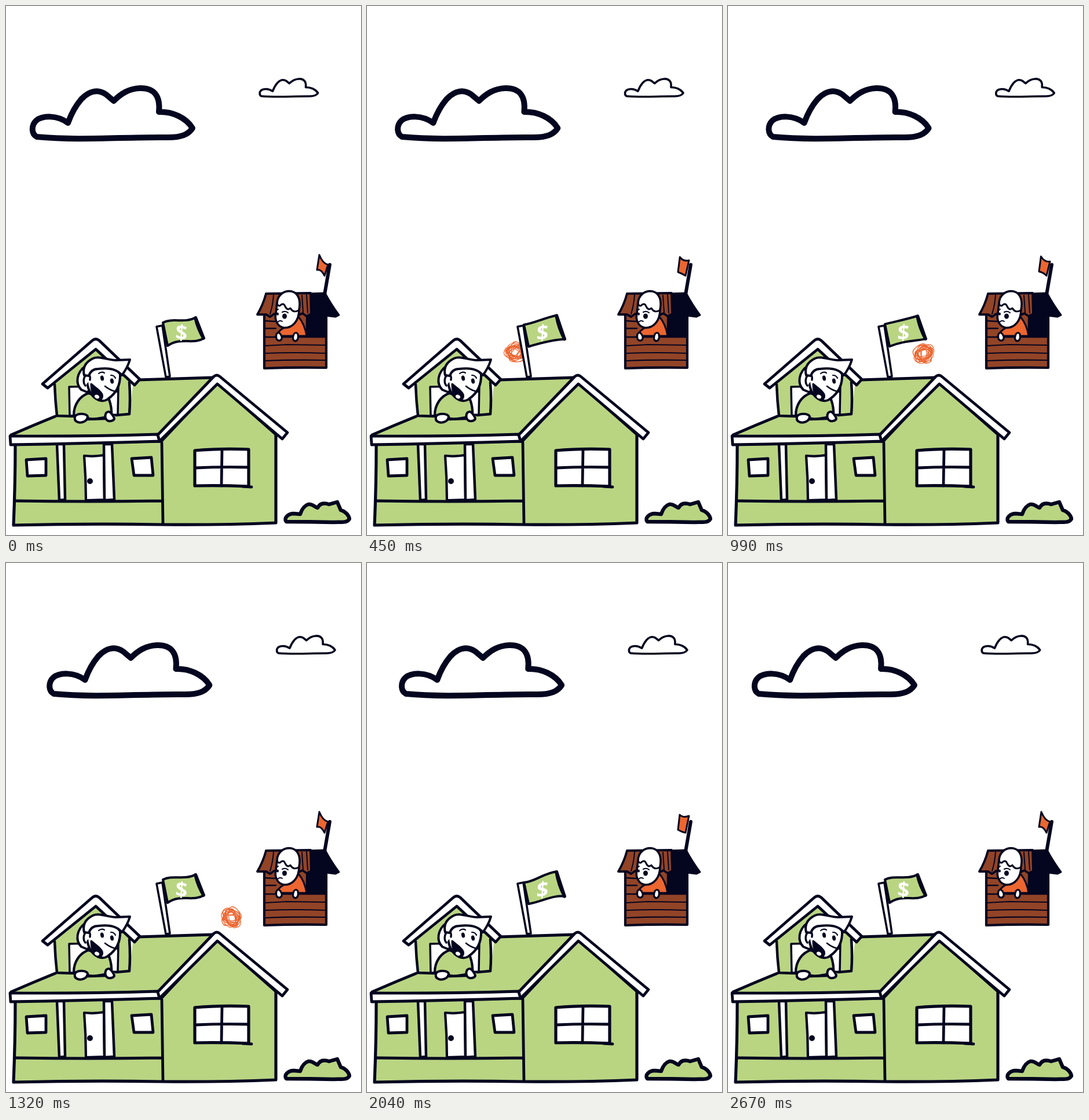
Write an HTML page with a canvas that moves like this. It is 613 by 914 pixels and loops after 2.7 s.

```html
<!DOCTYPE html>
<html lang="en">
<head>
<meta charset="utf-8">
<title>Two houses</title>
<style>
html, body { margin: 0; width: 100%; height: 100%; overflow: hidden; background: #fff; }
canvas { display: block; }
</style>
</head>
<body>
<canvas id="stage" width="613" height="914"></canvas>
<script>
const ctx = document.getElementById('stage').getContext('2d');
const INK = '#04051f', GREEN = '#b9d582', BROWN = '#924427', ORANGE = '#ec6630', WHITE = '#fff';
const LOOP = 2700, STEP = 30, TAU = Math.PI * 2;

ctx.lineJoin = ctx.lineCap = 'round';

function shape(d, fill, width = 5, stroke = INK) {
  const path = typeof d === 'string' ? new Path2D(d) : d;
  if (fill) { ctx.fillStyle = fill; ctx.fill(path); }
  if (width) { ctx.lineWidth = width; ctx.strokeStyle = stroke; ctx.stroke(path); }
}

function oval(x, y, rx, ry, fill, width = 0, tilt = 0) {
  const path = new Path2D();
  path.ellipse(x, y, rx, ry, tilt, 0, TAU);
  shape(path, fill, width);
}

const mix = (a, b, k) => a + (b - a) * k;

// Fills the blanks of a path with values blended between two poses.
function blend(text, from, to, k) {
  let i = 0;
  return text.replace(/_/g, () => { const v = mix(from[i], to[i], k); i++; return v.toFixed(2); });
}

const CLOUD = new Path2D('M53 226C44 221 43 207 52 198C63 189 88 188 107 202C112 188 118 175 130 161' +
  'C145 145 160 144 173 153L186 164C199 151 212 143 231 142C256 141 267 156 264 183' +
  'C287 182 311 193 322 211C315 222 303 227 280 227C200 226 130 233 53 226Z');

function clouds(dx) {
  ctx.save();
  ctx.translate(dx, 0);
  shape(CLOUD, WHITE, 10);
  ctx.translate(421.5, 75.5);
  ctx.scale(0.364, 0.355);
  shape(CLOUD, WHITE, 10);
  ctx.restore();
}

function makeScribble() {
  let seed = 11;
  const random = () => (seed = (seed * 16807) % 2147483647) / 2147483647;
  const point = i => {
    const r = 16 + 11 * random(), a = i * 2 + random();
    return [r * Math.cos(a), r * Math.sin(a)];
  };
  const path = new Path2D();
  let last = point(0);
  for (let i = 1; i < 46; i++) {
    const next = point(i);
    const middle = [(last[0] + next[0]) / 2, (last[1] + next[1]) / 2];
    if (i === 1) path.moveTo(...middle);
    else path.quadraticCurveTo(...last, ...middle);
    last = next;
  }
  return path;
}
const SCRIBBLE = makeScribble();

function ball(t) {
  if (t > 2000) return;
  const x = 224 + 0.1528 * (t - 240);
  const y = 602 + 11.5 * Math.cos(TAU * t / 1350) + 26 * Math.exp(-t / 150);
  ctx.save();
  ctx.translate(x, y);
  ctx.rotate(TAU * t / 1350);
  shape(SCRIBBLE, null, 1.2, ORANGE);
  ctx.restore();
}

function bigFlag(k) {
  shape('M260 554L270 552L283 640L276 641Z', WHITE, 3.6);
  shape(blend('M271 _C_ _ _ _ 328 _L342 _C_ _ _ _ 279 _Z',
    [547, 288, 538, 308, 549, 538, 574, 322, 586, 302, 571, 587],
    [552, 290, 551, 304, 536, 533, 576, 322, 573, 302, 585, 589], k), GREEN, 4);
  shape(blend('M327 _Q331 557 341 _', [539, 574], [534, 576], k), null, 5.5);
  ctx.save();
  ctx.translate(303, 564);
  ctx.transform(1, mix(0.1, -0.2, k), 0, 1, 0, 0);
  ctx.rotate(0.06);
  ctx.font = 'bold 36px "Noto Sans", sans-serif';
  ctx.textAlign = 'center';
  ctx.textBaseline = 'alphabetic';
  ctx.fillStyle = WHITE;
  ctx.fillText('$', 0, 13);
  ctx.restore();
}

function man() {
  // hair behind the head, shirt, then face
  shape('M137 622C122 633 119 652 130 663L142 668L150 630Z', WHITE, 4);
  shape('M117 707C117 688 128 674 142 669L178 680C181 688 183 696 182 709L150 714Z', GREEN, 4.2);
  shape('M143 627C137 645 140 663 150 674C158 682 168 685 176 679C189 670 198 656 197 636L187 624Z', WHITE, 4);
  shape('M137 656C132 650 134 639 140 637C145 637 146 641 145 646', WHITE, 3.5);
  shape('M135 638C132 626 136 616 150 609C162 604 176 612 190 612L214 611C211 621 207 629 200 638' +
    'C191 626 174 625 159 627C149 627 145 633 143 639Z', WHITE, 4);
  oval(166, 643, 3, 4.5, INK, 0, -0.2);
  oval(183, 648, 3, 4.5, INK, 0, -0.2);
  shape('M160 635Q165 631 170 634M181 638Q187 638 189 643', null, 2.2);
  shape('M171 657Q181 665 193 667', null, 2.6);
  shape('M147 653C154 659 163 664 166 671C168 678 163 682 157 679C149 674 147 664 147 653Z', INK, 3);
  oval(157, 675, 5, 4, WHITE, 1.5, 0.4);
  shape('M141 714L171 713', null, 4.5);
  shape('M120 708C125 703 138 704 141 709C141 718 129 722 122 718C118 716 118 711 120 708Z', WHITE, 4);
  shape('M173 703C178 698 182 703 186 710C189 715 183 718 177 717C171 715 170 708 173 703Z', WHITE, 4);
}

function dormer() {
  shape('M84 650L155 590L214 648L213 706L89 708Z', GREEN, 0);
  shape('M84 654Q85 682 88 708L118 709M213 650Q215 680 213 705L190 707', null, 4.5);
  shape('M109 658L194 656L193 706L110 708Z', WHITE, 3.5);
  shape('M63 653L149 578Q155 573 161 578L231 645L222 655L155 593L72 660Z', WHITE, 4.8);
  man();
}

function mainHouse() {
  shape('M8 742L84 708L214 700L220 646L357 643L262 742Z', GREEN, 0);
  shape('M9 741Q48 724 85 709M228 646Q290 644 357 642', null, 5);
  shape('M16 756L268 752L364 650L466 740L466 893Q370 897 270 896Q140 894 13 897Q16 825 16 756Z', GREEN, 5.2);
  shape('M269 754Q270 825 271 895M16 855Q140 857 269 855', null, 4.8);
  shape('M88 757L100 757L102 853L92 854Z', WHITE, 4.5);
  shape('M135 777Q152 779 169 776L170 853L138 854Q138 815 135 777Z', WHITE, 4.2);
  oval(145, 821, 5, 5, INK);
  shape('M169 757L183 757L187 853L170 854Z', WHITE, 4.5);
  shape('M35 784L69 782L69 811L37 812Z', WHITE, 4.8);
  shape('M217 782L251 780L254 811L221 811Z', WHITE, 4.8);
  shape('M326 768Q370 764 419 766L419 830Q370 828 326 829Z', WHITE, 5.2);
  shape('M373 767L372 829M328 798Q370 796 418 797M408 830L424 831', null, 4.8);
  shape('M7 743Q130 744 263 740L267 752Q130 756 8 758Z', WHITE, 4.8);
  shape('M262 741L359 640Q364 636 369 640L486 737L477 748L365 653L265 752Z', WHITE, 4.8);
  dormer();
}

function child() {
  shape('M466 570Q472 558 488 552L505 537Q516 550 519 570Z', ORANGE, 3);
  shape('M468 513C469 499 480 491 493 493C506 496 509 510 506 525C506 544 495 556 481 556' +
    'C469 555 463 542 466 531Z', WHITE, 3.6);
  shape('M468 514Q471 521 475 516Q480 513 482 519Q486 527 491 522Q496 531 505 526', null, 3);
  oval(481, 536, 4, 4.5, INK);
  oval(469, 532, 2, 2.5, INK);
  shape('M477 529Q483 526 487 530M466 526L470 524', null, 2);
  shape('M469 546Q473 542 477 545', null, 2);
  shape('M467 567Q470 562 474 567Q479 575 473 578Q465 579 467 567Z', WHITE, 3.2);
  shape('M497 567Q501 562 504 567Q506 577 500 579Q493 578 497 567Z', WHITE, 3.2);
}

function smallHouse(k) {
  shape('M559 447L550 499', null, 6);
  shape(blend('M_ _Q_ _ 556 _L550 466Q_ _ 537 _Z',
    [541, 430, 547, 445, 447, 544, 454, 456],
    [540, 435, 546, 441, 437, 544, 465, 461], k), ORANGE, 3);

  shape('M446 530L553 530L553 625Q500 624 446 626Z', BROWN, 4.2);
  shape('M520 497L551 496Q561 515 575 534L569 537L553 535L553 571L519 571Z', INK, 3);
  shape('M449 497L526 496L527 532L519 536L512 531L503 535L463 532L456 537L449 533L434 533Q444 516 449 497Z', BROWN, 3.8);
  shape('M462 499Q461 516 456 532M472 500L468 523M511 500L513 529M519 499L521 530', null, 2);
  shape('M448 544L464 545M448 557L466 557M448 572L552 572', null, 2.4);
  shape('M448 587L485 585L552 586M448 600Q500 598 552 600M448 613Q495 611 552 612', null, 2.2);
  child();
}

function bush() {
  shape('M484 891C479 885 487 877 497 877L508 878C511 869 515 863 522 861C530 860 533 866 538 867' +
    'C542 859 549 858 558 861L572 857L578 871C586 873 592 880 593 886C589 894 579 891 565 892Q525 891 484 891Z', GREEN, 6.4);
}

function draw(t) {
  const flagPose = (1 - Math.cos(TAU * t / 1350)) / 2;
  ctx.fillStyle = WHITE;
  ctx.fillRect(0, 0, 613, 914);
  clouds(14.75 * (1 - Math.cos(TAU * t / LOOP)));
  ball(t);
  bigFlag(flagPose);
  mainHouse();
  smallHouse(flagPose);
  bush();
}

const start = performance.now();
function tick() {
  const t = (performance.now() - start) % LOOP;
  draw(Math.floor(t / STEP) * STEP);
  requestAnimationFrame(tick);
}
tick();
</script>
</body>
</html>
```
